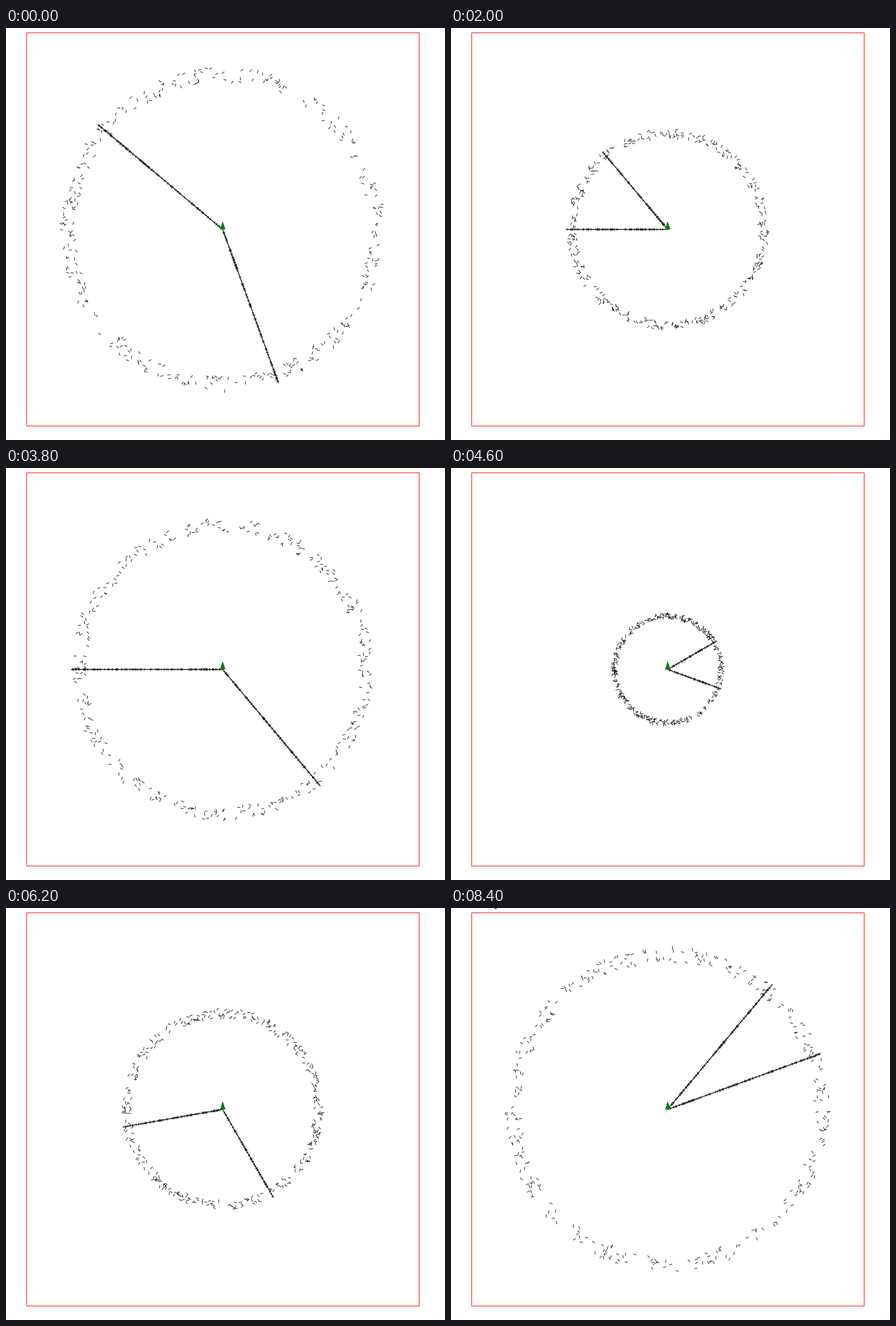
A matplotlib script that plays this animation: 773 px wide and 724 px high, repeating every 8500 ms.

```python
import numpy as np
import matplotlib.pyplot as plt
from matplotlib.animation import FuncAnimation
from matplotlib.collections import LineCollection
from matplotlib.patches import Polygon, Rectangle

W, H, DPI = 773, 724, 100
PX = 72 / DPI
CENTER = np.array([381.5, 354.0])
INK = "#0a120a"
RING_DASHES = 345

fig = plt.figure(figsize=(W / DPI, H / DPI), dpi=DPI, facecolor="white")
ax = fig.add_axes([0, 0, 1, 1])
ax.set_xlim(0, W)
ax.set_ylim(H, 0)
ax.axis("off")

ax.add_patch(Rectangle((36.5, 8.5), 691, 691, fill=False, ec="red",
                       lw=PX, snap=False))

rays = LineCollection([], colors="#0f200f", linewidths=1.5 * PX, zorder=2)
dashes = LineCollection([], colors=INK, linewidths=0.95 * PX, zorder=3)
ax.add_collection(rays)
ax.add_collection(dashes)
ax.add_patch(Polygon([(381.5, 339.5), (377, 354), (386.5, 354)],
                     fc="green", ec="none", zorder=4))

ARROW = np.array([(0, 0), (0, 14.5), (3, 14.5), (5, 18), (8.5, 17),
                  (7.5, 13), (11, 10.5)])
cursor = Polygon(ARROW, fc="#444444", ec="none", zorder=5, visible=False)
ax.add_patch(cursor)

# Pointer path: time in ms against x and y of the tip
PATH_T = [7300, 7400, 7500, 7600, 7800, 7900, 8000, 8200]
PATH_X = [-4, 30, 60, 73, 73, 73, 73, 72.5]
PATH_Y = [36, 37, 37, 37, 37, 30, 10, -16]


def unit(angle):
    """Direction for an angle in radians, counterclockwise on screen."""
    return np.stack([np.cos(angle), -np.sin(angle)], axis=-1)


def segments(middle, angle, length):
    half = unit(angle) * np.reshape(length, (-1, 1)) / 2
    return np.stack([middle - half, middle + half], axis=1)


def ring(rng, radius):
    around = rng.uniform(0, 2 * np.pi, RING_DASHES)
    reach = radius * rng.uniform(0.905, 0.995, RING_DASHES)
    middle = CENTER + unit(around) * reach[:, None]
    return segments(middle, rng.uniform(0, np.pi, RING_DASHES), 5.5)


def ticks(rng, radius, angle):
    count = int(radius * 0.4)
    reach = rng.uniform(4, radius, count)
    middle = CENTER + unit(angle) * reach[:, None]
    tilt = angle + np.pi / 2 + rng.normal(0, 0.12, count)
    return segments(middle, tilt, rng.uniform(3, 5, count))


def draw(frame):
    step = frame // 2
    rng = np.random.default_rng(500 + step)
    radius = 9.87 * (10 + (step + 19) % 21)
    angles = np.radians([290 + 20 * step, 140 + 40 * step])

    rays.set_segments([[CENTER, CENTER + unit(a) * (radius + 1)]
                       for a in angles])
    dashes.set_segments(np.concatenate(
        [ring(rng, radius)] + [ticks(rng, radius, a) for a in angles]))

    now = frame * 100
    cursor.set_visible(now >= PATH_T[0])
    tip = np.interp(now, PATH_T, PATH_X), np.interp(now, PATH_T, PATH_Y)
    cursor.set_xy(ARROW + tip)
    return rays, dashes, cursor


anim = FuncAnimation(fig, draw, frames=85, interval=100, repeat=True,
                     repeat_delay=0, blit=False)
plt.show()
```
